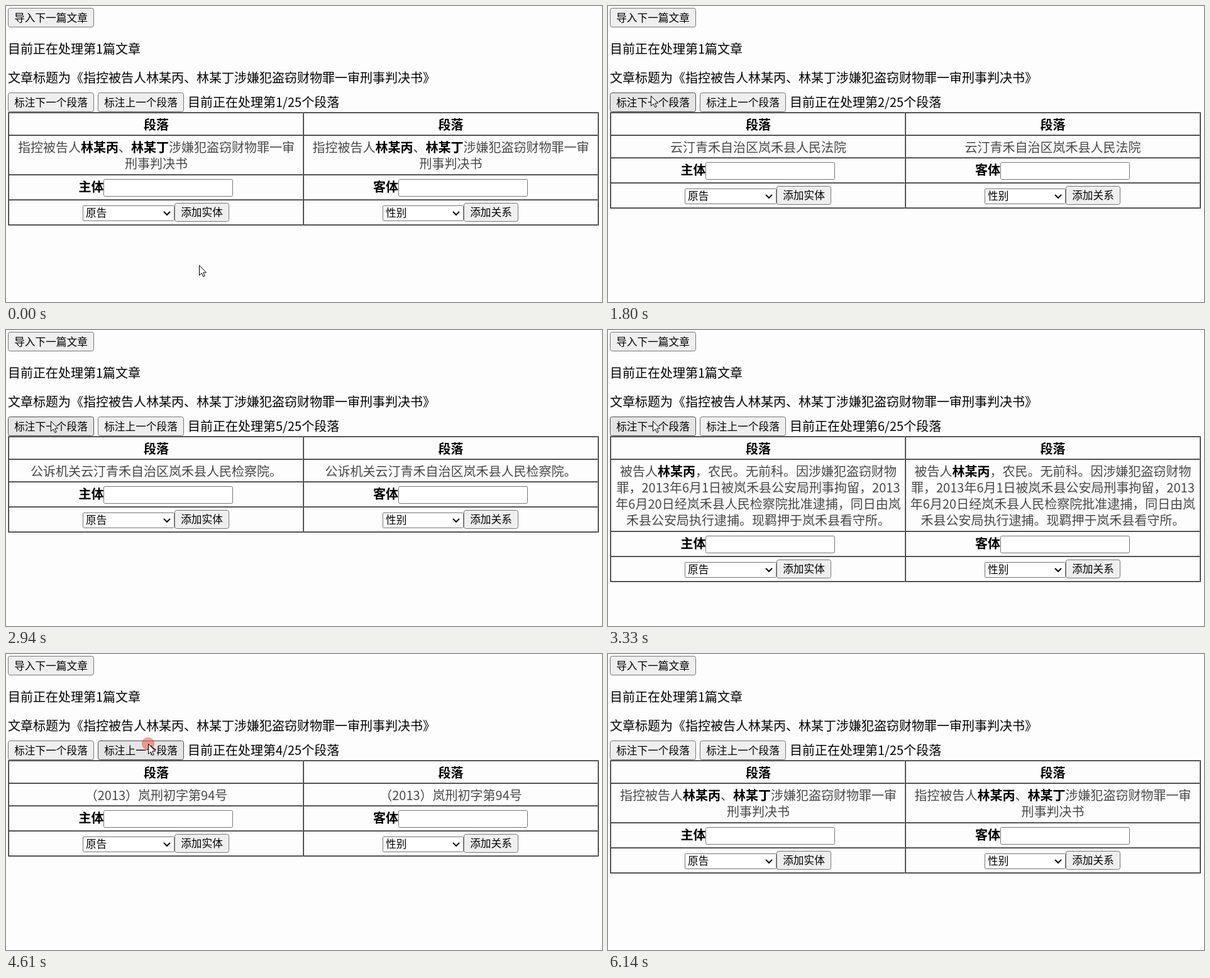
Recreate the animation shown at these times as an HTML page. Size 948x472 px, loop 6.4 s.

```html
<!DOCTYPE html>
<html lang="zh-CN">
<head>
<meta charset="utf-8">
<style>
html, body { margin: 0; height: 100%; overflow: hidden; background: #fdfdfd }
svg { display: block; width: 948px; height: 472px; font-family: "Noto Sans CJK SC", "Noto Sans CJK", sans-serif }
</style>
</head>
<body>
<svg id="stage" viewBox="0 0 948 472"></svg>
<script>
const STEP = 128, STEPS = 50;
const stage = document.getElementById('stage');

const pages = [
  ['指控被告人*林某丙*、*林某丁*涉嫌犯盗窃财物罪一审', '刑事判决书'],
  ['云汀青禾自治区岚禾县人民法院'],
  ['刑 事 判 决 书'],
  ['（2013）岚刑初字第94号'],
  ['公诉机关云汀青禾自治区岚禾县人民检察院。'],
  ['被告人*林某丙*，农民。无前科。因涉嫌犯盗窃财物',
   '罪，2013年6月1日被岚禾县公安局刑事拘留，2013',
   '年6月20日经岚禾县人民检察院批准逮捕，同日由岚',
   '禾县公安局执行逮捕。现羁押于岚禾县看守所。']
];

// [step, page shown from then on, steps the click ring stays]
const clicks = [[13, 2, 1], [16, 3, 2], [19, 4, 2], [23, 5, 0], [26, 6, 0],
  [33, 5, 2], [36, 4, 2], [39, 3, 2], [42, 2, 2], [46, 1, 2]];

// [step, x, y] of the pointer tip
const path = [[0, 307, 413], [4, 307, 413], [6, 298, 335], [8, 215, 232], [10, 88, 171], [11, 70, 148],
  [14, 68, 143], [21, 71, 145], [27, 71, 145], [28, 115, 148], [29, 175, 149], [30, 225, 144],
  [36, 226, 143], [41, 224, 146], [49, 225, 146]];

const buttonLook = {
  idle: ['#efefef', '#767676'],
  over: ['#e5e5e5', '#4f4f4f'],
  down: ['#f5f5f5', '#8d8d8d']
};

function pointerAt(k) {
  const i = Math.max(1, path.findIndex(p => p[0] >= k));
  const [k0, x0, y0] = path[i - 1], [k1, x1, y1] = path[i];
  const f = (k - k0) / (k1 - k0);
  return { x: x0 + (x1 - x0) * f, y: y0 + (y1 - y0) * f };
}

// y is the middle of the line; *...* marks bold
function text(x, y, str, { size = 20, weight = 400, anchor = 'start', fill = '#000' } = {}) {
  const marked = str.replace(/\*(.+?)\*/g, '<tspan font-weight="700" fill="#000">$1</tspan>');
  return `<text x="${x}" y="${y + size * .38}" font-size="${size}" font-weight="${weight}" ` +
    `text-anchor="${anchor}" fill="${fill}" word-spacing="1.3">${marked}</text>`;
}

const rect = (x, y, w, h, fill) => `<rect x="${x}" y="${y}" width="${w}" height="${h}" fill="${fill}"/>`;

// Table rules are a grey pixel followed by a dark one
const hRule = y => rect(3, y, 940, 1, '#808080') + rect(4, y + 1, 939, 1, '#2c2c2c');
const vRule = (x, h) => rect(x, 169, 1, h, '#808080') + rect(x + 1, 170, 1, h - 1, '#2c2c2c');

const box = (x, y, w, h, r, fill = '#fff', stroke = '#767676') =>
  `<rect x="${x + .5}" y="${y + .5}" width="${w - 1}" height="${h - 1}" rx="${r}" fill="${fill}" stroke="${stroke}"/>`;

function button(x, y, w, h, label, mouse) {
  const over = mouse && mouse.x >= x && mouse.x < x + w && mouse.y >= y && mouse.y < y + h;
  const look = buttonLook[!over ? 'idle' : mouse.down ? 'down' : 'over'];
  return box(x, y, w, h, 3, ...look) + text(x + w / 2, y + h / 2, label, { size: 16.67, anchor: 'middle' });
}

const select = (x, y, w, label) => box(x, y, w, 25, 1) +
  text(x + 5, y + 12, label, { size: 16.67 }) +
  `<path d="M${x + w - 17} ${y + 10}l5 5 5-5" fill="none" stroke="#000" stroke-width="2"/>`;

function column(mid, lines, row, subject, [selX, selW, option], action, mouse) {
  const center = { anchor: 'middle' };
  return text(mid, 189, '段落', { ...center, weight: 700 }) +
    lines.map((s, i) => text(mid, 225 + 26 * i, s, { ...center, weight: 300, fill: '#484848' })).join('') +
    text(mid - 123.5, row + 20, subject, { weight: 700 }) +
    box(Math.round(mid - 84), row + 8, 206, 28, 2) +
    select(selX, row + 50, selW, option) +
    button(selX + selW, row + 46, 87, 30, action, mouse);
}

function pointer({ x, y }, ring) {
  const halo = ring ? `<circle cx="${x}" cy="${y}" r="${ring * 10 - .5}" fill="#f64a3c" ` +
    `fill-opacity="${ring > 1 ? .15 : .5}" stroke="#e0503c" stroke-opacity="${.5 / ring}"/>` : '';
  return halo + `<path transform="translate(${x} ${y})" d="M.5.5V16.5L4.2 13 6.8 18.6 9.2 17.6 6.7 12H11.5Z" ` +
    `fill="#fff" stroke="#000"/>`;
}

function scene(k) {
  let page = 1, ring = 0, down = false;
  for (const [at, to, rings] of clicks) {
    if (k >= at) page = to;
    if (k >= at && k < at + rings) ring = k - at + 1;
    if (rings && k === at - 1) down = true;
  }
  const mouse = k < 48 ? { ...pointerAt(k), down } : null;
  const lines = pages[page - 1];
  const row = Math.round(215 + 26.25 * lines.length);
  return button(3, 3, 137, 31, '导入下一篇文章', mouse) +
    text(3, 68, '目前正在处理第1篇文章') +
    text(3, 114, '文章标题为《指控被告人林某丙、林某丁涉嫌犯盗窃财物罪一审刑事判决书》') +
    button(3, 138, 137, 31, '标注下一个段落', mouse) +
    button(146, 138, 137, 31, '标注上一个段落', mouse) +
    text(289, 153, `目前正在处理第${page}/25个段落`) +
    [169, 205, row, row + 40, row + 80].map(hRule).join('') +
    [3, 472, 941].map(x => vRule(x, row - 87)).join('') +
    column(239, lines, row, '主体', [122, 146, '原告'], '添加实体', mouse) +
    column(707.5, lines, row, '客体', [599, 129, '性别'], '添加关系', mouse) +
    (mouse ? pointer(mouse, ring) : '');
}

let shown = -1;
function tick() {
  const k = Math.floor((performance.now() + 6) / STEP) % STEPS;
  if (k !== shown) stage.innerHTML = scene(shown = k);
  requestAnimationFrame(tick);
}
tick();
</script>
</body>
</html>
```
